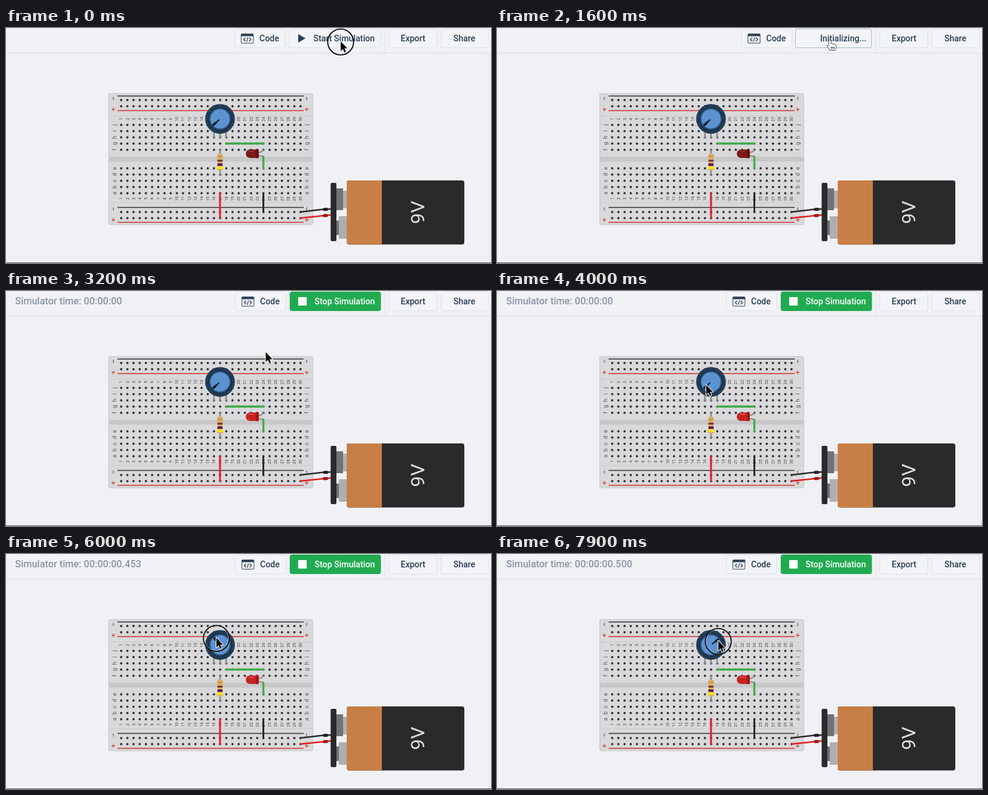
An HTML page with a canvas for the animation above (8000 ms loop, 800x387 px).

```html
<!DOCTYPE html>
<html lang="en">
<head>
<meta charset="utf-8">
<title>Circuit simulator</title>
<style>
html, body { margin: 0; width: 100%; height: 100%; overflow: hidden; background: #f0f1f5; }
canvas { display: block; }
</style>
</head>
<body>
<canvas id="stage" width="800" height="387"></canvas>
<script>
const c = document.getElementById('stage').getContext('2d');
const LOOP = 8000, STEP = 100;
const INIT = 300, RUN = 2000, ARROW = 2800, DRAG = 4400;
const INK = '#2b3f55';

// time, x, y of the pointer tip
const POINTER = [[0, 552, 22], [300, 552, 22], [600, 549, 20], [2000, 549, 20], [2500, 500, 51],
  [2800, 484, 66], [3800, 345, 153], [4400, 345, 158], [5200, 339, 149], [6000, 347, 138],
  [6500, 351, 134], [7000, 358, 133], [7500, 364, 137], [7900, 365, 143]];
// time, knob angle in degrees clockwise from the top
const KNOB = [[0, -132], [DRAG, -132], [5200, -88], [6000, -40], [7000, 0], [7900, 53]];

function at(keys, t) {
  const i = keys.findIndex(k => k[0] > t);
  if (i < 0) return keys[keys.length - 1].slice(1);
  const a = keys[i - 1], b = keys[i], u = (t - a[0]) / (b[0] - a[0]);
  return a.slice(1).map((v, n) => v + (b[n + 1] - v) * u);
}

function box(x, y, w, h, fill, r = 0, stroke) {
  c.beginPath();
  c.roundRect(x, y, w, h, r);
  if (fill) { c.fillStyle = fill; c.fill(); }
  if (stroke) { c.strokeStyle = stroke; c.lineWidth = 1; c.stroke(); }
}

function line(color, width, ...p) {
  c.beginPath();
  for (let i = 0; i < p.length; i += 2) c.lineTo(p[i], p[i + 1]);
  c.strokeStyle = color;
  c.lineWidth = width;
  c.stroke();
}

function disc(x, y, r, fill) {
  c.beginPath();
  c.arc(x, y, r, 0, 7);
  c.fillStyle = fill;
  c.fill();
}

function text(s, x, y, font, fill, align = 'left') {
  c.font = font + ' Roboto, sans-serif';
  c.fillStyle = fill;
  c.textAlign = align;
  c.fillText(s, x, y);
}

function upText(s, x, y, font, fill) {
  c.save();
  c.translate(x, y);
  c.rotate(-Math.PI / 2);
  text(s, 0, 0, font, fill, 'center');
  c.restore();
}

function button(x, right, fill = '#f3f4f7', stroke = '#dde1e7') {
  box(x + .5, 1.5, right - x - 1, 31, fill, 3, stroke);
}

const label = (s, x, fill = INK) => text(s, x, 22, '500 14px', fill);

function codeButton(x) {
  button(x, x + 84);
  box(x + 11, 10, 20, 15, null, 1, INK);
  box(x + 11, 9.5, 20, 4, INK);
  line(INK, 1.4, x + 18, 16, x + 15, 19, x + 18, 22);
  line(INK, 1.4, x + 24, 16, x + 27, 19, x + 24, 22);
  line(INK, 1.2, x + 22, 15.5, x + 20, 22.5);
  label('Code', x + 41);
}

function header(t) {
  box(0, 0, 800, 41, '#f1f2f6');
  box(0, 40.5, 800, 1, '#dcdfe4');
  box(624.5, 0, 1, 41, '#dfe2e7');
  box(797, 41, 1, 345, '#e0e3e8');
  box(0, 386, 800, 1, '#5a5c60');
  button(631, 711);
  label('Export', 651);
  button(717, 796);
  label('Share', 738);

  if (t < INIT) {
    codeButton(377);
    button(467, 618);
    c.beginPath();
    c.moveTo(482, 10);
    c.lineTo(494, 17);
    c.lineTo(482, 24);
    c.fillStyle = INK;
    c.fill();
    label('Start Simulation', 507);
  } else if (t < RUN) {
    codeButton(403);
    button(492, 618, '#f3f4f7', '#a8bac5');
    label('Initializing...', 533);
  } else {
    codeButton(378);
    button(468, 618.5, '#21ab51', '#21ab51');
    box(482, 10, 14, 14, '#fff', 1);
    label('Stop Simulation', 509, '#fff');
    let ms = '';
    if (t > DRAG) {
      const v = t < 7000 ? 453 + (t - 6000) * .028 : 481 + (t - 7000) * .0211;
      ms = '.' + Math.round(v);
    }
    text('Simulator time: 00:00:00' + ms, 15, 22, '500 16px', '#8995a3');
  }
}

const col = i => 190 + i * 10.2;

function board() {
  box(169.5, 108, 336.5, 216, '#d9d8da', 2, '#c3c3c6');
  box(170, 212, 336, 8, '#c8c7c9');
  box(170, 144.5, 336, 1, '#cccbce');
  box(170, 287, 336, 1, '#cccbce');
  for (const [y, color] of [[112, '#333'], [136, '#cf3030'], [295.5, '#333'], [320, '#cf3030']])
    line(color, 1.3, 184, y, 491, y);
  for (const x of [177, 496])
    for (const y of [116, 298]) {
      line('#444', 1, x, y - 2.5, x, y + 2.5);
      const p = y + 18;
      line('#cf3030', 1.1, x - 3, p, x + 3, p);
      line('#cf3030', 1.1, x, p - 3, x, p + 3);
    }

  const rows = [118.5, 128.8, 303, 313];
  [...'jihgfedcba'].forEach((s, i) => {
    const y = 159.5 + i * 10.25 + (i > 4 ? 20.3 : 0);
    rows.push(y);
    for (const x of [182, 499]) upText(s, x, y, '9px', '#555');
  });
  for (let i = 0; i < 30; i++) {
    for (const y of [150, 281]) upText(i + 1, col(i) + 2.3, y, '6.5px', '#444');
    for (const y of rows) {
      disc(col(i), y + .5, 2.3, '#bbbabd');
      disc(col(i), y, 1.8, '#29292b');
    }
  }
}

function wires() {
  c.lineCap = 'round';
  line('#3fae48', 3.4, 363.5, 190.3, 424.5, 190.3);
  line('#e01f1f', 3, 353, 272, 353, 313);
  line('#2b2b2d', 3, 424.5, 272, 424.5, 303);
  line('#2b2b2d', 2.6, 485.5, 303, 524, 298.5, 538, 298);
  line('#e01f1f', 2.6, 485.5, 313, 524, 309, 538, 307.5);
  line('#222', 5, 525, 298.7, 529, 298.5);
  line('#a91515', 5, 525, 309, 529, 308.7);
}

function battery() {
  box(545, 264, 11, 36, '#707276');
  box(556, 268, 7, 29, '#adafb2');
  box(545, 317, 5, 24, '#707276');
  box(549, 310, 14, 37, '#adafb2');
  box(535.5, 255, 9.5, 96, '#2a2a2b', 2);
  box(562, 251, 194, 105.5, '#2b2a2b', 4);
  box(562, 251, 58, 105.5, '#c87f45', [4, 0, 0, 4]);
  upText('9V', 690, 303.5, '32px', '#dedede');
}

function resistor() {
  line('#8c8c8e', 2.6, 353, 200.5, 353, 241);
  box(348, 207, 10, 10, '#dcb26c', 4);
  box(349, 213, 8, 18, '#d8ab63');
  box(348, 227, 10, 8, '#dcb26c', 4);
  box(350, 210.5, 6, 1.3, '#a87a3a');
  box(348.7, 217, 8.6, 3, '#7b3a1d');
  box(348.7, 223, 8.6, 4, '#5a1b49');
  box(348, 228.5, 10, 3.5, '#ffe800');
}

function led(on) {
  line('#8c8c8e', 2, 417, 205, 421, 204, 424.5, 200.5);
  line('#8c8c8e', 2, 416, 210, 424.5, 211.5);
  line('#3fae48', 3.4, 424.5, 212, 424.5, 231);
  box(395.5, 200, 21, 14, on ? '#c62222' : '#7b1a1a', [7, 2, 2, 7]);
  box(412, 199.5, 5, 15, on ? '#a51818' : '#651212', 2);
  line(on ? '#e65a55' : '#953434', 1.5, 401, 203, 409, 203);
}

function pot(angle) {
  for (const x of [343, 353, 363]) line('#8c8c8e', 2.6, x, 170, x, 180);
  disc(353, 149.7, 24.5, '#203a54');
  disc(353, 149.7, 19.5, '#172c42');
  c.save();
  c.translate(353, 149.7);
  for (let i = 0; i < 11; i++) {
    const a = (i - 5) * .48 - Math.PI / 2;
    disc(22 * Math.cos(a), 22 * Math.sin(a), .8, '#48647f');
  }
  c.rotate(angle * Math.PI / 180);
  disc(0, 0, 16, '#5b93d1');
  c.lineCap = 'butt';
  c.setLineDash([1.2, 1.2]);
  c.beginPath();
  c.arc(0, 0, 17, 0, 7);
  c.strokeStyle = '#487bb4';
  c.lineWidth = 2;
  c.stroke();
  c.setLineDash([]);
  c.lineCap = 'round';
  line('#14212f', 2.4, 0, -3, 0, -14);
  line('#14212f', 4, 0, -10, 0, -14.5);
  c.restore();
}

const arrow = new Path2D('M0 0V16L3.7 12.6 6.2 18.2 8.7 17.1 6.3 11.6H11.3Z');
const hand = new Path2D('M-1.5 1Q0-1.5 1.6 1V6.5Q3.5 5 4.7 7 6.8 5.8 7.6 7.8 10 7 10 9.5V12' +
  'Q10 14 8.5 16H0Q-1.5 12.5-4 10Q-4.5 7.5-1.5 9.5Z');

function pointer(t) {
  const [x, y] = at(POINTER, t);
  const isHand = t >= INIT && t < ARROW;
  if (t < INIT || t >= DRAG) {
    c.beginPath();
    c.arc(x, y + 1, 21.3, 0, 7);
    c.strokeStyle = '#111';
    c.lineWidth = 2;
    c.stroke();
    c.beginPath();
    c.arc(x, y + 1, 19.9, 0, 7);
    c.strokeStyle = '#fff9';
    c.lineWidth = .8;
    c.stroke();
  }
  c.save();
  c.translate(x, y);
  c.lineJoin = 'round';
  c.strokeStyle = isHand ? '#111' : '#fff';
  c.fillStyle = isHand ? '#fff' : '#050505';
  c.lineWidth = isHand ? 1.4 : 2;
  c.stroke(isHand ? hand : arrow);
  c.fill(isHand ? hand : arrow);
  if (isHand) for (const n of [2.5, 4.7, 6.9]) line('#111', 1, n, 11, n, 14);
  c.restore();
}

function draw(t) {
  box(0, 0, 800, 387, '#f0f1f5');
  c.lineCap = 'butt';
  header(t);
  board();
  wires();
  battery();
  resistor();
  led(t >= RUN);
  pot(at(KNOB, t)[0]);
  pointer(t);
}

const start = performance.now();
let shown = -1;
function tick() {
  const t = Math.floor((performance.now() - start) % LOOP / STEP) * STEP;
  if (t !== shown) draw(shown = t);
  requestAnimationFrame(tick);
}
tick();
</script>
</body>
</html>
```
